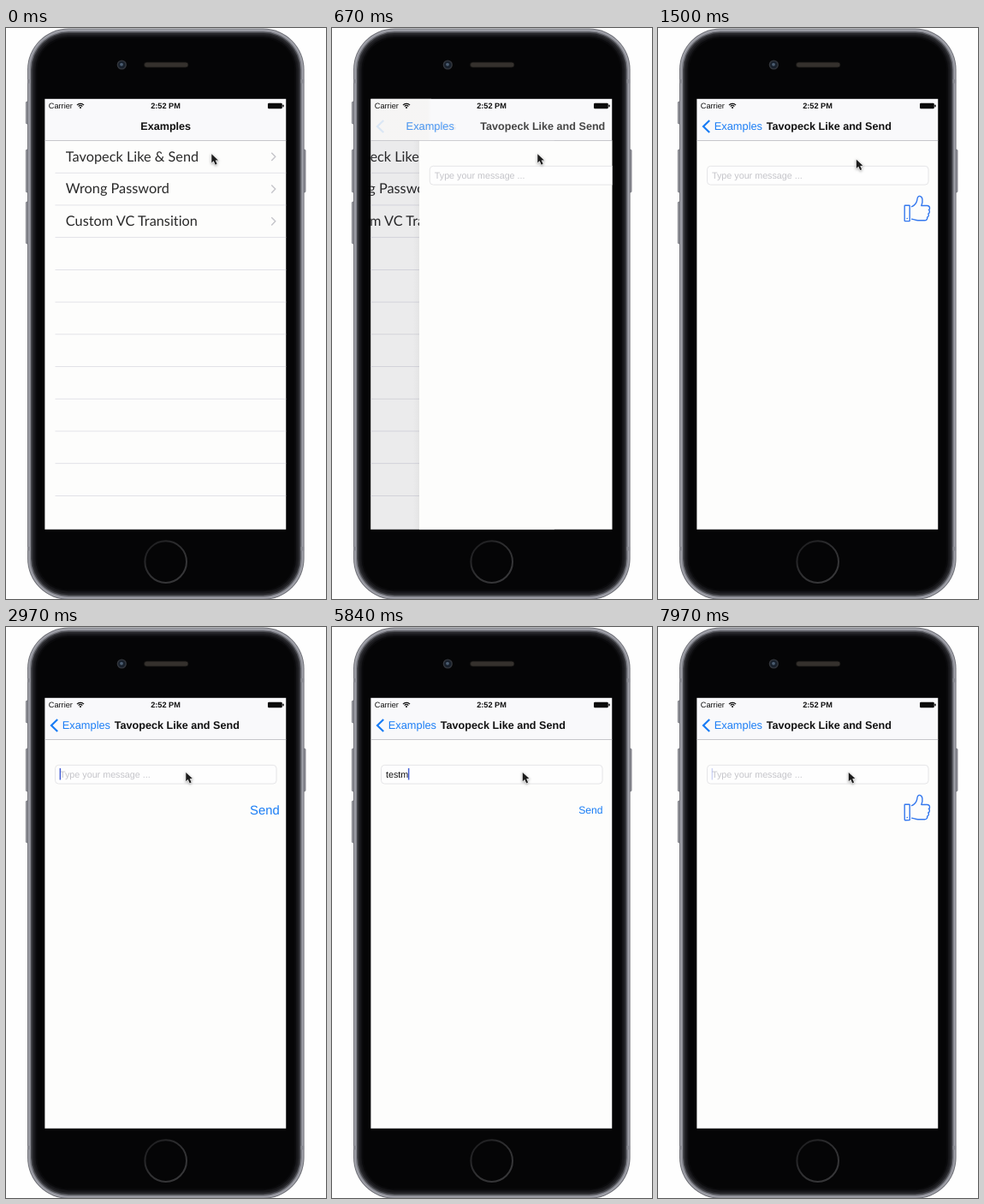
Write an HTML page with a canvas that moves like this. It is 374 by 667 pixels and loops after 8000 ms.

```html
<!DOCTYPE html>
<html lang="en">
<head>
<meta charset="utf-8">
<title>Message demo</title>
<style>
  html, body { margin: 0; width: 100%; height: 100%; overflow: hidden; background: #fefefe; }
  canvas { display: block; width: 374px; height: 667px; }
</style>
</head>
<body>
<canvas id="stage"></canvas>
<script>
const W = 374, H = 667, LOOP = 8000;
const SCREEN = { x: 45.2, y: 82.6, w: 282.3, h: 503.1 };
const NAV_BOTTOM = 131.5, ROW = 37.72;
const BLUE = '#1a7df5', ICON_BLUE = '#3478ee';
const SANS = '"Liberation Sans", Arial, sans-serif';
const ROWS = ['Tavopeck Like & Send', 'Wrong Password', 'Custom VC Transition'];
const TITLE = 'Tavopeck Like and Send';

const PUSH = 500, SEND_IN = 2970, SEND_OUT = 6940;
// When the typed text changes.
const TYPED = [[3000, 't'], [4970, 'te'], [5100, 'tes'], [5240, 'test'], [5270, 'testm'],
  [6100, 'test'], [6340, 'tes'], [6540, 'te'], [6700, 't'], [6940, '']];
// Caret blinks: fade-out start, fade-in start, fade-in length.
const BLINKS = [[3680, 4040, 160], [4640, 4970, 1], [5840, 6100, 1], [7610, 7930, 160]];

const canvas = document.getElementById('stage');
const dpr = window.devicePixelRatio || 1;
canvas.width = W * dpr;
canvas.height = H * dpr;
const ctx = canvas.getContext('2d');
ctx.textRendering = 'geometricPrecision';

const clamp = v => Math.max(0, Math.min(1, v));
const mix = (a, b, p) => a + (b - a) * p;

function rect(x, y, w, h, fill) {
  ctx.fillStyle = fill;
  ctx.fillRect(x, y, w, h);
}

function round(x, y, w, h, r, fill, stroke, line = 1) {
  ctx.beginPath();
  ctx.roundRect(x, y, w, h, r);
  if (fill) { ctx.fillStyle = fill; ctx.fill(); }
  if (stroke) { ctx.strokeStyle = stroke; ctx.lineWidth = line; ctx.stroke(); }
}

function disc(x, y, r, fill) {
  ctx.beginPath();
  ctx.arc(x, y, r, 0, Math.PI * 2);
  ctx.fillStyle = fill;
  ctx.fill();
}

function text(str, x, y, font, fill, align = 'left') {
  ctx.font = font;
  ctx.fillStyle = fill;
  ctx.textAlign = align;
  ctx.fillText(str, x, y);
}

function line(points, stroke, width) {
  ctx.beginPath();
  points.forEach(([x, y]) => ctx.lineTo(x, y));
  ctx.strokeStyle = stroke;
  ctx.lineWidth = width;
  ctx.stroke();
}

function faded(alpha, draw) {
  ctx.save();
  ctx.globalAlpha *= clamp(alpha);
  draw();
  ctx.restore();
}

function gradient(x0, y0, x1, y1, ...stops) {
  const g = ctx.createLinearGradient(x0, y0, x1, y1);
  stops.forEach(([at, color]) => g.addColorStop(at, color));
  return g;
}

function clipTo(x, y, w, h, draw) {
  ctx.save();
  ctx.beginPath();
  ctx.rect(x, y, w, h);
  ctx.clip();
  draw();
  ctx.restore();
}

function drawPhone() {
  rect(0, 0, W, H, '#fefefe');
  for (const [x, y, h] of [[23.3, 86, 26], [23.3, 142, 50], [23.3, 203, 49], [346.5, 142, 50]]) {
    round(x, y, 3.6, h, 1.2, '#8e8f97', '#6c6d75', 0.6);
  }
  // Metal rim, shading inwards to black glass.
  const rim = [[0, '#6f7077'], [1, '#a2a3ab'], [2.6, '#85868e'], [4, '#47484d'], [5.5, '#252529'],
    [7.5, '#17171a'], [9.5, '#0a0a0c'], [11.5, '#050506']];
  for (const [inset, color] of rim) {
    round(25 + inset, 0.6 + inset, 323.6 - 2 * inset, 667.2 - 2 * inset, 48 - inset, color);
  }
  for (const y of [60, 606]) {
    rect(25.5, y, 3.5, 4.5, '#8b8c94');
    rect(344.6, y, 3.5, 4.5, '#8b8c94');
  }

  disc(135.3, 43, 5.6, '#34373d');
  disc(135.3, 43, 4.2, '#18202b');
  disc(135, 42.6, 1.9, '#4b5c70');
  round(161.5, 40, 51.5, 6, 3, '#35312d', '#161514', 0.8);

  ctx.beginPath();
  ctx.arc(186.7, 623.6, 24.3, 0, Math.PI * 2);
  ctx.strokeStyle = gradient(166, 602, 206, 646, [0, '#1d1d1f'], [0.5, '#303032'], [1, '#38383a']);
  ctx.lineWidth = 2;
  ctx.stroke();
}

function drawStatus() {
  text('Carrier', 49.8, 94, '9.2px ' + SANS, '#111');
  text('2:52 PM', 186.5, 94, 'bold 9.2px ' + SANS, '#111', 'center');
  ctx.strokeStyle = '#111';
  ctx.lineWidth = 1.3;
  for (const r of [3, 5.3]) {
    ctx.beginPath();
    ctx.arc(87, 93.6, r, -Math.PI * 0.77, -Math.PI * 0.23);
    ctx.stroke();
  }
  disc(87, 93, 1.1, '#111');
  round(306, 87.8, 16.8, 6.4, 1.2, '#0a0a0a');
  round(323.3, 89.6, 1.4, 2.8, 0.6, '#0a0a0a');
}

function drawList() {
  rect(SCREEN.x, NAV_BOTTOM, SCREEN.w, SCREEN.h, '#fdfdfc');
  for (let i = 1; i < 12; i++) {
    rect(57.5, NAV_BOTTOM - 0.4 + ROW * i, 270, 0.8, '#dcdce3');
  }
  ctx.save();
  ctx.letterSpacing = '0.01px'; // switches ligatures off
  ROWS.forEach((label, i) => {
    const y = NAV_BOTTOM + ROW * (i + 0.5);
    text(label, 69.8, y + 5.2, '16.3px Lato, sans-serif', '#2a2a2a');
    line([[310.3, y - 4.6], [314.8, y], [310.3, y + 4.6]], '#c5c5ca', 1.4);
  });
  ctx.restore();
}

function drawThumb(angle) {
  ctx.save();
  ctx.translate(302.6, 211.5);
  ctx.rotate(angle);
  ctx.lineJoin = 'round';
  round(-14.4, -4.3, 6, 18.4, 0.6, null, ICON_BLUE, 1.4);
  disc(-11.4, 11, 0.8, ICON_BLUE);
  ctx.stroke(new Path2D('M-6.6 -2.6 C-2.6 -4.2 -.4 -7.2 .2 -10.4 C.5 -13.2 1 -15.3 3.3 -15.1 ' +
    'C6.8 -14.6 7.4 -9.4 5.2 -4 L12 -4 C15.4 -3.9 15.7 .2 13.8 1 ' +
    'C15.4 2 15 5 13.2 5.6 C14.3 6.8 13.6 9.2 12 9.7 C12.6 11.6 11.2 13.3 9 13.3 ' +
    'L1.2 13.3 C-2 13.2 -3.6 11.8 -6.6 11.6'));
  ctx.restore();
}

// Damped swing from 1 towards 0; s is in seconds.
const swing = s => Math.exp(-4.8 * s) * Math.cos(Math.PI * 2 * s / 0.4);

function drawButton(t) {
  if (t >= SEND_IN && t < SEND_OUT) {
    const size = 1 + 0.22 * swing((t - SEND_IN) / 1000);
    ctx.save();
    ctx.translate(302.4, 213.5);
    ctx.scale(size, size);
    text('Send', 0, 4.2, '12.2px ' + SANS, BLUE, 'center');
    ctx.restore();
  } else {
    const angle = t < SEND_OUT ? 0 : 52 * swing((t - SEND_OUT) / 1000);
    drawThumb(angle * Math.PI / 180);
  }
}

function caretAlpha(t) {
  if (t < 2300) return 0;
  for (const [out, back, ramp] of BLINKS) {
    if (t >= out && t < back + ramp) {
      return clamp(Math.max(1 - (t - out) / 160, (t - back) / ramp));
    }
  }
  return 1;
}

function drawForm(t) {
  rect(SCREEN.x, NAV_BOTTOM, SCREEN.w, SCREEN.h, '#fdfdfc');
  round(57.5, 161.3, 258.6, 21.8, 4, '#fefefe', '#e3e3e5', 0.9);
  let typed = '';
  for (const [at, value] of TYPED) if (t >= at) typed = value;
  const font = '10.75px ' + SANS;
  if (typed) text(typed, 63, 176, font, '#111');
  else text('Type your message ...', 63, 176, font, '#c4c4c9');
  ctx.font = font;
  const x = 62.6 + ctx.measureText(typed).width;
  faded(caretAlpha(t), () => rect(x, 165, 1.5, 13.5, '#4660d6'));
  drawButton(t);
}

function drawNav(t, edge) {
  rect(SCREEN.x, SCREEN.y, SCREEN.w, NAV_BOTTOM - SCREEN.y, '#f9f9fb');
  if (t > PUSH && edge > 0.5) {
    const end = SCREEN.x + edge + 14;
    faded(1 - edge / SCREEN.w, () => rect(SCREEN.x, SCREEN.y, end - SCREEN.x,
      NAV_BOTTOM - SCREEN.y, gradient(end - 4, 0, end, 0, [0, '#f5f4f3'], [1, '#f9f9fb'])));
  }
  rect(SCREEN.x, NAV_BOTTOM - 0.4, SCREEN.w, 0.8, '#c9c9ce');
  drawStatus();

  const left = (1 - clamp((t - PUSH) / 327)) ** 2;
  const shown = 1 - left;
  const labelX = mix(65.8, 157.3, left);
  faded(left * left, () => text('Examples', labelX, 119.4, 'bold 12.6px ' + SANS, '#111'));
  if (shown <= 0) return;
  faded(shown, () => {
    text('Examples', labelX, 119.4, '12.8px ' + SANS, BLUE);
    text(TITLE, 126.8 + 204 * left, 119.4, 'bold 12.6px ' + SANS, '#111');
  });
  faded(shown ** 8, () => line([[60.2, 108], [53, 115], [60.2, 122]], BLUE, 2.2));
}

function drawScreen(t) {
  const k = Math.max(0, t - PUSH - 6) * 0.0181;
  const left = t > 1040 ? 0 : (1 + k) * Math.exp(-k);
  const edge = SCREEN.w * left;
  if (left > 0) {
    ctx.save();
    ctx.translate(-0.3 * SCREEN.w * (1 - left), 0);
    drawList();
    ctx.restore();
    const x = SCREEN.x + edge;
    if (left < 1) {
      rect(SCREEN.x, NAV_BOTTOM, edge, SCREEN.h, `rgba(10,10,40,${0.09 * (1 - left)})`);
      faded(left * 4, () => rect(x - 7, NAV_BOTTOM, 7, SCREEN.h,
        gradient(x - 7, 0, x, 0, [0, 'rgba(0,0,0,0)'], [1, 'rgba(0,0,0,.04)'])));
    }
  }
  if (left < 1) {
    ctx.save();
    ctx.translate(edge, 0);
    drawForm(t);
    ctx.restore();
  }
  drawNav(t, edge);
}

function drawPointer(t) {
  const a = clamp((t - 1410) / 260), b = clamp((t - 4010) / 190);
  const ease = p => p * p * (3 - 2 * p);
  ctx.save();
  ctx.translate(mix(240, 210, ease(a)) + 12.5 * ease(b), mix(147.3, 170, ease(a)));
  const arrow = new Path2D('M.3 0 L.3 10.2 L2.7 8 L4.7 12.4 L6.6 11.5 L4.7 7.3 L7.9 7.1 Z');
  ctx.shadowColor = 'rgba(0,0,0,.4)';
  ctx.shadowBlur = 3 * dpr;
  ctx.shadowOffsetY = dpr;
  ctx.lineJoin = 'round';
  ctx.lineWidth = 1.2;
  ctx.strokeStyle = '#f4f4f4';
  ctx.stroke(arrow);
  ctx.shadowColor = 'transparent';
  ctx.fillStyle = '#1c1c1c';
  ctx.fill(arrow);
  ctx.restore();
}

function render(t) {
  ctx.setTransform(dpr, 0, 0, dpr, 0, 0);
  drawPhone();
  clipTo(SCREEN.x, SCREEN.y, SCREEN.w, SCREEN.h, () => drawScreen(t));
  drawPointer(t);
}

const start = performance.now();
function tick() {
  render((performance.now() - start) % LOOP);
  requestAnimationFrame(tick);
}
tick();
</script>
</body>
</html>
```
